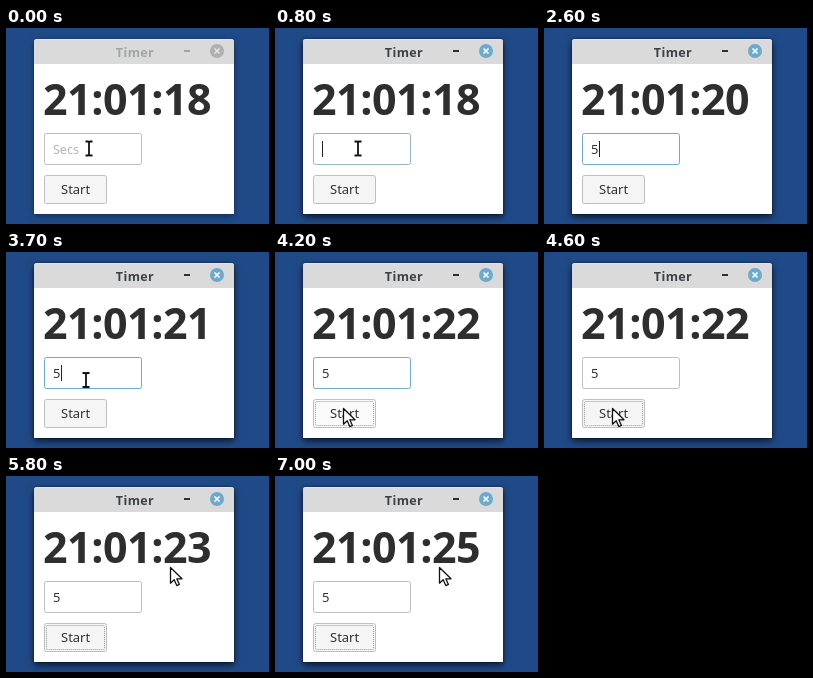
Animation of 263x196 px, one loop 8000 ms. Source, as an HTML page:

```html
<!DOCTYPE html>
<html lang="en">
<head>
<meta charset="utf-8">
<title>Timer</title>
<style>
  html, body { margin: 0; width: 100%; height: 100%; overflow: hidden; background: #204a87; }
  #win {
    position: absolute; left: 28px; top: 11px; width: 200px; height: 175px;
    border-radius: 3px 3px 0 0; background: #fff;
    box-shadow: 0 3px 7px rgba(0, 0, 0, .7), 0 0 2px rgba(0, 0, 0, .5);
  }
  #win.idle { box-shadow: 0 2px 6px rgba(0, 0, 0, .4), 0 0 1px rgba(0, 0, 0, .3); }
  svg { position: absolute; left: 0; top: 0; display: block; }
  text { font: 13px "Noto Sans", "Open Sans", sans-serif; fill: #303030; }
  #title { font-weight: 600; font-size: 12.5px; letter-spacing: .4px; fill: #3c4247; text-anchor: middle; }
  #clock { font-weight: 700; font-size: 43px; letter-spacing: -.5px; fill: #2e2e2e; }
  #hint { font-size: 12.5px; fill: #b4b4b4; }
  #min { fill: #303030; }
  #close { fill: #6cabcd; }
  #cross { stroke: #fff; stroke-width: 1.6; }
  .idle #title, .idle #min { fill: #a2a5a6; }
  .idle #close { fill: #b0b0b0; }
  .idle #cross { stroke: #e6e6e6; }
</style>
</head>
<body>
<div id="win"></div>
<svg id="ui" width="263" height="196" viewBox="0 0 263 196">
  <path d="M28 36V14q0-3 3-3H225q3 0 3 3V36z" fill="#dadada"/>
  <path d="M31 11.5H225" stroke="#e6e6e6"/>
  <text id="title" x="129" y="28.5">Timer</text>
  <rect id="min" x="178" y="22" width="6" height="2"/>
  <circle id="close" cx="211" cy="23" r="7"/>
  <path id="cross" d="M208.5 20.5l5 5m0-5l-5 5"/>

  <text id="clock" x="37" y="86.5"></text>

  <rect id="entry" x="38.5" y="105.5" width="97" height="31" rx="2" fill="#fff"/>
  <text id="hint" x="47" y="126">Secs</text>
  <text id="value" x="47" y="126">5</text>
  <rect id="caret" y="113" width="1" height="16" fill="#222"/>

  <rect id="button" x="38.5" y="147.5" width="62" height="28" rx="2" stroke="#bebebe"/>
  <rect id="ring" x="40.5" y="149.5" width="58" height="24" rx="1" fill="none" stroke="#999" stroke-dasharray="1 1"/>
  <text x="55" y="166">Start</text>

  <path id="beam" d="M-3.5 -7H-1L0 -6L1 -7H3.5M0 -6V6M-3.5 7H-1L0 6L1 7H3.5" fill="none" stroke="#111" stroke-width="1.8"/>
  <path id="arrow" d="M.5 .5V16.2L4.2 12.8L6.8 18.6L9.4 17.4L6.8 11.8H12z" fill="#fff" stroke="#111" stroke-width="1.3" stroke-linejoin="round"/>
</svg>
<script>
  const LOOP = 8000, STEP = 100;
  const $ = id => document.getElementById(id);
  const show = (id, on) => $(id).style.display = on ? '' : 'none';
  const set = (id, name, v) => $(id).setAttribute(name, v);
  const clamp = v => Math.max(0, Math.min(1, v));
  const mix = (a, b, k) => `rgb(${a.map((v, i) => Math.round(v + (b[i] - v) * k))})`;

  // Pointer positions as [time, x, y]
  const path = [
    [0, 83, 120.5], [3500, 83, 120.5], [3700, 80, 128], [3900, 71, 150],
    [4100, 68, 156], [4900, 68, 156], [5000, 72, 151], [5100, 92, 131],
    [5200, 121, 108], [5300, 141, 94], [5500, 154, 91], [5800, 164, 91], [LOOP, 164, 91]
  ];

  function pointer(t) {
    const i = path.findIndex(p => p[0] > t);
    const a = path[i - 1], b = path[i];
    const k = (t - a[0]) / (b[0] - a[0]);
    return [1, 2].map(n => Math.round((a[n] + (b[n] - a[n]) * k) * 2) / 2);
  }

  function draw(t) {
    const active = t >= 800, typed = t >= 2600, clicked = t >= 4200;
    $('win').classList.toggle('idle', !active);
    $('ui').classList.toggle('idle', !active);
    $('clock').textContent = '21:01:' + (18 + Math.floor(t / 1000));

    const focus = clicked ? clamp((4400 - t) / 220) : active ? clamp(.5 + (t - 800) / 400) : 0;
    set('entry', 'stroke', mix([190, 190, 190], [108, 171, 205], focus));
    show('hint', !active);
    show('value', typed);
    show('caret', active && !clicked && !(t >= 1600 && t < 2000));
    set('caret', 'x', typed ? 55 : 47);

    set('button', 'fill', t >= 3900 && t < 4600 ? (t < 4500 ? '#fafafa' : '#f8f8f8') : '#f5f5f5');
    show('ring', clicked);

    const [x, y] = pointer(t);
    const overEntry = t < 5000 && y < 137;
    const hidden = typed && t < 3600;
    show('beam', overEntry && !hidden);
    show('arrow', !overEntry);
    set('beam', 'transform', `translate(${x} ${y})`);
    set('arrow', 'transform', `translate(${x} ${y})`);
  }

  const start = performance.now();
  function tick() {
    const t = (performance.now() - start) % LOOP;
    draw(Math.floor(t / STEP) * STEP);
    requestAnimationFrame(tick);
  }
  tick();
</script>
</body>
</html>
```
